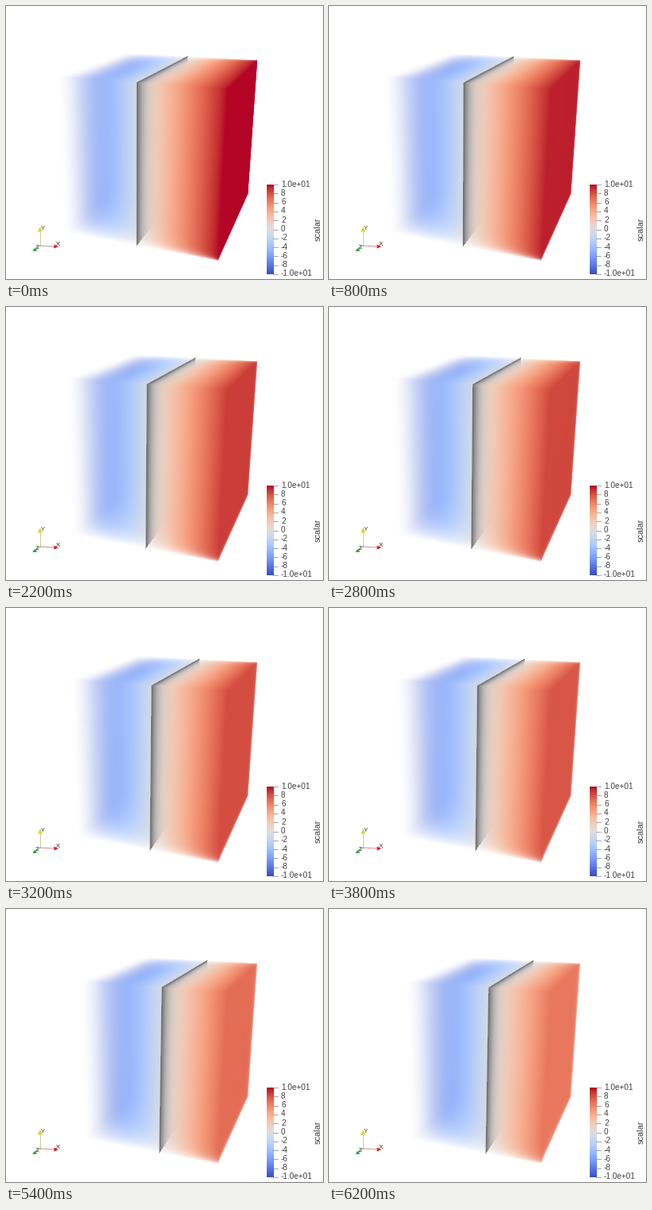
A matplotlib script for the animation above (6.4 s loop, 400 by 344 pixels).

```python
import itertools

import matplotlib.pyplot as plt
import numpy as np
from matplotlib.animation import FuncAnimation

W, H, DPI = 400, 344, 100
PX = 72 / DPI
FRAMES, INTERVAL = 32, 200
SHIFT = 0.0107          # drift of the zero level per frame, in half cube widths
UNIT = 0.15             # distance over which the opacity curve applies
SURFACE = 0.42          # grey of the zero-level sheet
CMAP = plt.get_cmap("coolwarm")

# Cube corners (half width 1) and where the camera puts them on the stage.
CORNERS = [
    ((-1, 1, 1), (64, 89.5)), ((-1, -1, 1), (72.7, 285)),
    ((0, 1, 1), (165, 96.5)), ((0, -1, 1), (165, 302)),
    ((1, 1, 1), (279.5, 104.5)), ((1, -1, 1), (268, 321)),
    ((0, 1, -1), (229.5, 63)), ((0, -1, -1), (224.6, 225)),
    ((1, 1, -1), (317.5, 68.5)), ((1, -1, -1), (305.5, 237)),
]


def solve_camera():
    rows, values = [], []
    for (x, y, z), (u, v) in CORNERS:
        rows.append([x, y, z, 1, 0, 0, 0, 0, -u * x, -u * y, -u * z])
        rows.append([0, 0, 0, 0, x, y, z, 1, -v * x, -v * y, -v * z])
        values += [u, v]
    solution = np.linalg.lstsq(np.array(rows, float), np.array(values, float), rcond=None)[0]
    return np.append(solution, 1).reshape(3, 4)


camera = solve_camera()


def project(x, y, z):
    u, v, w = camera @ (x, y, z, 1)
    return u / w, v / w


# One ray per pixel of the part of the stage that holds the cube.
LEFT, TOP, RIGHT, BOTTOM = 56, 52, 326, 328
inverse = np.linalg.inv(camera[:, :3])
eye = -inverse @ camera[:, 3]
cols, rows = np.meshgrid(np.arange(LEFT, RIGHT) + 0.5, np.arange(TOP, BOTTOM) + 0.5)
rays = np.stack([cols, rows, np.ones_like(cols)], axis=-1) @ inverse.T
rays /= np.linalg.norm(rays, axis=-1, keepdims=True)
rays *= np.sign(rays @ -eye)[..., None]
near_far = np.stack([(-1 - eye) / rays, (1 - eye) / rays])
enter = near_far.min(axis=0).max(axis=-1)
leave = near_far.max(axis=0).min(axis=-1)
inside = enter < leave
enter, leave, ray_x = enter[inside], leave[inside], rays[inside][:, 0]

# Transfer function: colour and extinction by scalar from -10 to 10.
LEVELS = 1024
ramp = np.linspace(0, 1, LEVELS)
COLOURS = CMAP(ramp)[:, :3].astype(np.float32)
EXTINCTION = (-np.log1p(-np.minimum(ramp, 0.9995)) / UNIT).astype(np.float32)
STEPS = np.linspace(0, 1, 41) ** 1.6


def render(level):
    hit_at = (level - eye[0]) / ray_x
    hit = (hit_at > enter) & (hit_at < leave)
    length = (np.where(hit, hit_at, leave) - enter).astype(np.float32)
    start = ((eye[0] + enter * ray_x - level + 1) / 2 * (LEVELS - 1)).astype(np.float32)
    slope = (length * ray_x / 2 * (LEVELS - 1)).astype(np.float32)

    light = np.ones(len(length), np.float32)
    colour = np.zeros((len(length), 3), np.float32)
    for a, b in zip(STEPS[:-1], STEPS[1:]):
        index = np.clip(start + slope * np.float32((a + b) / 2), 0, LEVELS - 1).astype(np.intp)
        weight = light * (1 - np.exp(-EXTINCTION[index] * length * np.float32(b - a)))
        colour += weight[:, None] * COLOURS[index]
        light -= weight
    colour += (light * np.where(hit, SURFACE, 1))[:, None]

    image = np.ones(inside.shape + (3,), np.float32)
    image[inside] = np.clip(colour, 0, 1)
    return image


fig = plt.figure(figsize=(W / DPI, H / DPI), dpi=DPI, facecolor="white")
ax = fig.add_axes([0, 0, 1, 1])
ax.axis("off")


def label(x, y, text, size=10, colour="#404040", **options):
    ax.text(x, y, text, fontsize=size * PX, color=colour, family="Liberation Sans",
            va="center", **options)


def draw_colour_bar():
    ax.imshow(ramp[::-1, None], cmap=CMAP, extent=(329, 338, 338, 225),
              aspect="auto", interpolation="bilinear")
    for value in range(-10, 11, 2):
        y = 281.5 - 5.65 * value
        ax.plot([337, 343], [y, y], color="#808080", lw=0.7 * PX)
        label(347, y - 0.5, f"{value:.1e}" if abs(value) == 10 else str(value))
    label(393.5, 281.5, "scalar", 11, rotation=90, ha="center")


def draw_orientation_axes():
    origin = (43, 302)
    arms = [
        ((43, 285), "#c9c99a", "#dcd232", [(43, 278), (40, 284.5), (46, 284.5)]),
        ((61, 303), "#dc8c8c", "#d21414", [(66, 303.3), (60.5, 300.5), (60.5, 305.5)]),
        ((38, 306), "#78b478", "#14a01e", [(33.5, 309), (36, 305), (39.5, 308.5)]),
    ]
    for end, line, fill, cone in arms:
        ax.plot(*zip(origin, end), color=line, lw=1 * PX)
        ax.fill(*zip(*cone), color=fill, lw=0)
    label(46.5, 280, "Y", 8, "#3c3c28", ha="center")
    label(65.5, 300.5, "X", 8, "#641414", ha="center")
    label(39.5, 305, "Z", 8, "#144614", ha="center")


volume = ax.imshow(np.ones(inside.shape + (3,)), extent=(LEFT, RIGHT, BOTTOM, TOP),
                   aspect="auto", interpolation="nearest")
(sheet_edge,) = ax.plot([], [], color="#707070", lw=0.9 * PX, alpha=0.7)
draw_colour_bar()
draw_orientation_axes()
ax.set_xlim(0, W)
ax.set_ylim(H, 0)


def update(frame):
    level = frame * SHIFT
    volume.set_data(render(level))
    outline = [project(level, y, z) for y, z in ((1, -1), (1, 1), (-1, 1))]
    sheet_edge.set_data(*zip(*outline))
    return volume, sheet_edge


animation = FuncAnimation(fig, update, frames=FRAMES, interval=INTERVAL, repeat=True)
plt.show()
```
